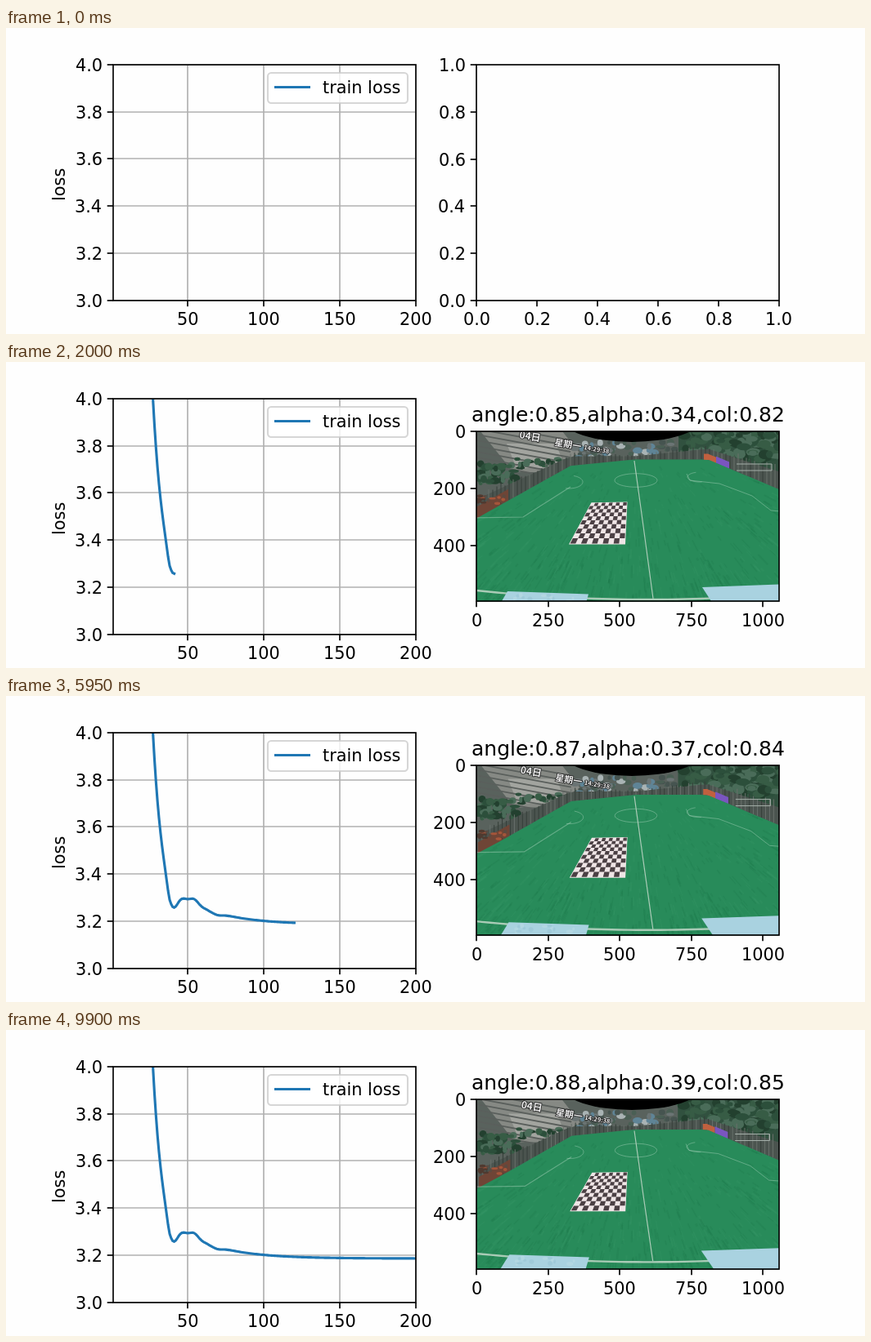
An HTML page with a canvas that plays this animation: 1050 by 375 pixels, repeating every 10 s.

```html
<!DOCTYPE html>
<html lang="en">
<head>
<meta charset="utf-8">
<title>Training loss</title>
<style>
html, body { margin: 0; width: 100%; height: 100%; overflow: hidden; background: #fefefe; }
canvas { display: block; }
</style>
</head>
<body>
<canvas id="stage" width="1050" height="375"></canvas>
<script>
const ctx = document.getElementById('stage').getContext('2d');
const LOOP = 10000, EPOCH = 50, VIEW_EVERY = 500;
const FONT = '"DejaVu Sans", Verdana, sans-serif';
const plot = { l: 131.25, r: 501.14, t: 45, b: 333.75 };
const empty = { l: 575.1, r: 945, t: 45, b: 333.75 };
const photo = { l: 575.1, r: 945, t: 85.3, b: 293.4 };

function random(seed) {
  return () => (seed = (seed * 16807) % 2147483647) / 2147483647;
}

const range = (n, f) => Array.from({ length: n }, (_, i) => f(i));
const bell = (x, mid, width) => Math.exp(-(((x - mid) / width) ** 2));

// Steep descent, overshoot, two ripples and a slow exponential tail.
function loss(epoch) {
  const s = Math.max(0, 37.6 - epoch);
  return 3.186 + .031 * Math.exp((81.6 - epoch) / 26.3) + .0255 * s + .00025 * s ** 3 -
    .076 * bell(epoch, 40.2, 4.2) + .02 * bell(epoch, 54.2, 3.6) - .009 * bell(epoch, 69, 5);
}

// ---- chart helpers ----
// Aligns by the inked width and snaps to whole pixels.
function text(str, x, y, anchor = .5, size = 20.83) {
  ctx.font = `${size}px ${FONT}`;
  ctx.textAlign = 'left';
  ctx.fillStyle = '#000';
  const m = ctx.measureText(str);
  const ink = m.actualBoundingBoxLeft + m.actualBoundingBoxRight;
  ctx.fillText(str, Math.round(x - ink * anchor) + m.actualBoundingBoxLeft, Math.round(y));
}

function segment(x0, y0, x1, y1, color = '#000', width = 1.667) {
  ctx.strokeStyle = color;
  ctx.lineWidth = width;
  ctx.beginPath();
  ctx.moveTo(x0, y0);
  ctx.lineTo(x1, y1);
  ctx.stroke();
}

function xTick(box, x, label) {
  const px = Math.round(x), y = Math.round(box.b);
  segment(px, y, px, y + 7.3);
  text(label, x, box.b + 30.5);
}

function yTick(box, y, label) {
  const x = Math.round(box.l), py = Math.round(y);
  segment(x - 7.3, py, x, py);
  text(label, box.l - 14.6, y + 8, 1);
}

function spines(box) {
  const [l, r, t, b] = [box.l, box.r, box.t, box.b].map(Math.round);
  ctx.strokeStyle = '#000';
  ctx.lineWidth = 1.667;
  ctx.strokeRect(l, t, r - l, b - t);
}

function clipTo(box) {
  ctx.save();
  ctx.beginPath();
  ctx.rect(box.l, box.t, box.r - box.l, box.b - box.t);
  ctx.clip();
}

function drawLoss(epoch) {
  const xOf = e => plot.l + (e - 1) * 1.8588;
  const yOf = v => plot.b - (v - 3) * 288.75;
  const epochs = range(4, i => 50 * (i + 1)), levels = range(6, i => 3 + i / 5);

  clipTo(plot);
  for (const e of epochs) segment(Math.round(xOf(e)), plot.t, Math.round(xOf(e)), plot.b, '#b0b0b0');
  for (const v of levels) segment(plot.l, Math.round(yOf(v)), plot.r, Math.round(yOf(v)), '#b0b0b0');
  ctx.strokeStyle = '#1f77b4';
  ctx.lineWidth = 3.125;
  ctx.lineCap = 'square';
  ctx.lineJoin = 'round';
  ctx.beginPath();
  for (let e = 25; e <= epoch; e++) ctx.lineTo(xOf(e), yOf(loss(e)));
  ctx.stroke();
  ctx.restore();

  for (const e of epochs) xTick(plot, xOf(e), e);
  for (const v of levels) yTick(plot, yOf(v), v.toFixed(1));
  spines(plot);

  ctx.save();
  ctx.translate(72, 192);
  ctx.rotate(-Math.PI / 2);
  text('loss', 0, 0);
  ctx.restore();

  ctx.beginPath();
  ctx.roundRect(320, 55, 171, 37, 4.2);
  ctx.fillStyle = 'rgba(255,255,255,.8)';
  ctx.fill();
  ctx.strokeStyle = 'rgba(204,204,204,.8)';
  ctx.lineWidth = 2.08;
  ctx.stroke();
  segment(328, 72.5, 372, 72.5, '#1f77b4', 3.125);
  text('train loss', 387, 80, 0);
}

function drawEmptyAxes() {
  for (let i = 0; i <= 5; i++) {
    const label = (i / 5).toFixed(1);
    xTick(empty, empty.l + i * 73.98, label);
    yTick(empty, empty.b - i * 57.75, label);
  }
  spines(empty);
}

// ---- camera view ----
let zoom = 0, drift = 0;

// Blends between the near view (zoom 1) and the settled view, which drifts slowly.
function warp([x, y]) {
  const u = y - 145, dx = x - 769, right = Math.max(0, dx);
  const nearX = 768 + dx * 1.65;
  const nearY = 129 + 1.4 * u + 14 * Math.tanh(u / 14) + .0014 * right * right;
  const farX = x + (770 - x) * .015 * drift;
  const farY = y + Math.min(2.5, (208 - y) * .08) * drift;
  return [farX + (nearX - farX) * zoom, farY + (nearY - farY) * zoom];
}

function trace(pts) {
  ctx.beginPath();
  for (const p of pts) ctx.lineTo(...warp(p));
}

function fill(color, pts) {
  trace(pts);
  ctx.fillStyle = color;
  ctx.fill();
}

function stroke(color, width, pts) {
  trace(pts);
  ctx.strokeStyle = color;
  ctx.lineWidth = width;
  ctx.stroke();
}

const quad = (x0, y0, x1, y1, lean = 0) => [[x0, y0], [x1, y0], [x1 + lean, y1], [x0 + lean, y1]];

function arc(x, y, rx, ry, from = 0, to = 2 * Math.PI) {
  return range(41, i => {
    const a = from + (to - from) * i / 40;
    return [x + rx * Math.cos(a), y + ry * Math.sin(a)];
  });
}

function blobs(seed, count, x, y, w, h, size, colors) {
  const rnd = random(seed);
  for (let i = 0; i < count; i++) {
    const [px, py] = warp([x + rnd() * w, y + rnd() * h]);
    ctx.fillStyle = colors[i % colors.length];
    ctx.beginPath();
    ctx.ellipse(px, py, size * (.5 + rnd()), size * (.4 + rnd() * .6), 0, 0, 7);
    ctx.fill();
  }
}

function stamp(str, x, y, size) {
  ctx.save();
  ctx.translate(...warp([x, y]));
  ctx.rotate(.17);
  ctx.font = `bold ${size}px "Noto Sans CJK SC", "Noto Sans CJK", sans-serif`;
  ctx.textAlign = 'left';
  ctx.lineWidth = 1.6;
  ctx.strokeStyle = '#222';
  ctx.strokeText(str, 0, 0);
  ctx.fillStyle = '#eee';
  ctx.fillText(str, 0, 0);
  ctx.restore();
}

// Far edge of the pitch, and strips that stand on it.
const edge = x => 119.5 + .56 * Math.max(0, 690 - x) + .42 * Math.max(0, x - 858) +
  .1 * Math.max(0, Math.min(768 - x, 78));

function strip(color, x0, x1, height) {
  const xs = range(41, i => x0 + (x1 - x0) * i / 40);
  const top = xs.map(x => [x, edge(x) - height(x)]).reverse();
  fill(color, [...xs.map(x => [x, edge(x) + .5]), ...top]);
}

function drawSurroundings() {
  const greens = ['#2c4f3b', '#375c45', '#23402f', '#4a6c59'];
  const greys = ['#6b7474', '#a9b3b4', '#465450', '#5f8496', '#4a5f54'];
  const fence = x => 4 + .1 * Math.abs(x - 768);

  fill('#59625d', quad(400, 20, 1150, 300));
  fill('#868984', quad(560, 60, 660, 135, 60));
  fill('#a2a49f', quad(612, 100, 672, 130, 12));
  for (let i = 0; i < 9; i++) {
    const y = 74 + i * 7;
    stroke('#5a5f5c', 1.8, [[570, y], [690, y + 22]]);
  }
  blobs(41, 60, 695, 98, 125, 20, 4, greys);
  fill('#31513f', quad(822, 60, 980, 150));
  blobs(7, 130, 825, 84, 125, 36, 6, greens);
  blobs(29, 45, 575, 124, 48, 24, 5, greens);
  blobs(31, 24, 625, 118, 65, 12, 4, greens);

  strip('#4b544f', 540, 980, fence);
  const rnd = random(77);
  for (let x = 575; x < 945; x += 5) {
    const h = fence(x) * (1 + rnd() * .4);
    stroke(rnd() < .5 ? '#68706b' : '#363f3a', 1, [[x, edge(x)], [x, edge(x) - h]]);
  }
  strip('#6f4536', 575, 614, () => 14);
  blobs(19, 16, 577, 164, 34, 14, 3, ['#4f3a30', '#a5553a', '#5c4a40']);
  strip('#c0603f', 853, 868, () => 7);
  strip('#7a55c0', 868, 884, () => 8);

  // The rim of the undistorted frame does not drift.
  ctx.fillStyle = '#000';
  ctx.beginPath();
  ctx.ellipse(765, 70 - 70 * zoom, 85, 28, 0, 0, 7);
  ctx.fill();
  stamp('04日', 627, 93, 12);
  stamp('星期一', 670, 102, 11);
  stamp('14:29:38', 706, 107, 7.5);
}

function drawGrass() {
  const xs = range(75, i => 390 + i * 10);
  fill('#288b5a', [...xs.map(x => [x, edge(x)]), [1130, 460], [390, 460]]);
  const rnd = random(2024);
  for (let i = 0; i < 800; i++) {
    const y = 124 + Math.pow(rnd(), .8) * 170, x = 560 + rnd() * 400;
    const len = .02 + rnd() * .08;
    const tone = rnd() < .6 ? 'rgba(20,105,62,.16)' : 'rgba(75,165,115,.13)';
    if (y > edge(x) + 2) stroke(tone, 1 + rnd() * 1.5, [[x, y], [x + (x - 768) * len, y + (y - 80) * len]]);
  }
}

function drawMarkings() {
  const faint = 'rgba(180,218,195,.42)', chalk = '#a9cbb6';
  stroke(faint, 1, arc(770, 145, 26, 8.3));
  stroke(chalk, 1.2 + zoom * .6, [[768, 121], [779, 201], [791, 290]]);
  stroke(faint, 1.2, [[560, 191], [632, 190], [690, 153]]);
  stroke(faint, 1, arc(688, 147, 17, 8, -1.2, 1.8));
  stroke(faint, 1, [[832, 137], [836, 145], [872, 149], [912, 164], [935, 182], [960, 184]]);
  stroke(faint, 1, arc(848, 141, 15, 6, 1.4, 4.4));
  stroke('#a5b0aa', 1, quad(893, 125, 936, 133));
  stroke(chalk, 2.4, range(40, i => [560 + i * 10, 291 - 11 * ((i * 10 - 225) / 210) ** 2]));
}

function drawBoard() {
  const N = 10;
  const at = (u, v) => {
    const t = v / (v + 1.35 * (1 - v));
    return [715.5 - 27.5 * t + u * (44 + 25 * t), 172.2 + 51.3 * t - .8 * u * (1 - t)];
  };
  const cell = (color, u0, v0, u1, v1) => fill(color, [at(u0, v0), at(u1, v0), at(u1, v1), at(u0, v1)]);
  const pos = i => .015 + .97 * i / N;
  cell('#efe5e6', 0, 0, 1, 1);
  for (let r = 0; r < N; r++) {
    for (let c = 1 - r % 2; c < N; c += 2) cell('#4b4044', pos(c), pos(r), pos(c + 1), pos(r + 1));
  }
}

function drawCamera(step) {
  zoom = Math.max(0, 1 - (step - 1) / 2.4) ** 1.3;
  drift = Math.max(0, Math.min(1, (step - 4) / 11));

  clipTo(photo);
  ctx.lineJoin = 'round';
  drawSurroundings();
  drawGrass();
  drawMarkings();
  drawBoard();
  fill('#a9d2e0', [[613, 281], [712, 284.5], [705, 310], [596, 310]]);
  fill('#a9d2e0', [[851, 276], [960, 272], [960, 315], [876, 315]]);
  blobs(53, 14, 622, 285, 78, 9, 3, ['rgba(190,222,230,.5)', 'rgba(150,196,212,.5)']);
  ctx.restore();

  const scale = (photo.r - photo.l) / 1056;
  for (let x = 0; x <= 1000; x += 250) xTick(photo, photo.l + x * scale, x);
  for (let y = 0; y <= 400; y += 200) yTick(photo, photo.t + y * scale, y);
  spines(photo);

  const angle = .85 - .13 * zoom + .03 * drift;
  const alpha = .34 + .11 * zoom + .05 * drift;
  const col = .82 - .1 * zoom + .03 * drift;
  text(`angle:${angle.toFixed(2)},alpha:${alpha.toFixed(2)},col:${col.toFixed(2)}`, 760.05, 73, .5, 25);
}

function draw(ms) {
  ctx.fillStyle = '#fefefe';
  ctx.fillRect(0, 0, 1050, 375);
  drawLoss(Math.floor(ms / EPOCH) + 1);
  const step = Math.floor(ms / VIEW_EVERY);
  if (step < 1) drawEmptyAxes();
  else drawCamera(step);
}

const start = performance.now();
function tick() {
  draw((performance.now() - start) % LOOP);
  requestAnimationFrame(tick);
}
tick();
</script>
</body>
</html>
```
